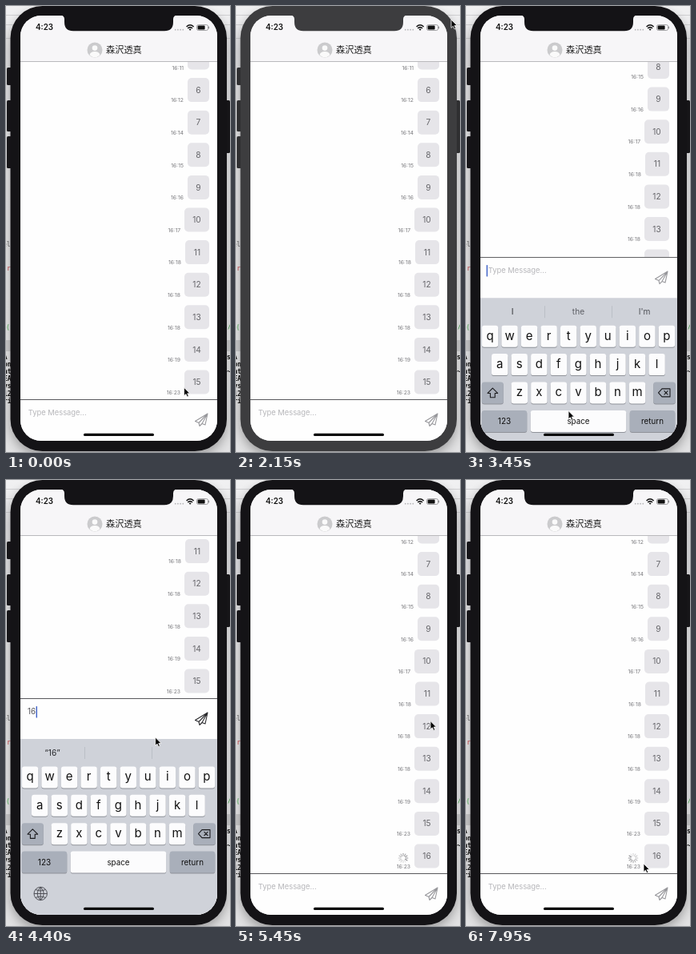
An HTML page for the animation above (8 s loop, 280 by 558 pixels).

```html
<!DOCTYPE html>
<html lang="ja">
<head>
<meta charset="utf-8">
<title>Chat</title>
<style>
html, body { margin: 0; width: 100%; height: 100%; overflow: hidden; background: #dcdcde; }
svg { display: block; width: 100vw; height: 100vh; }
text { font-family: Inter, "Noto Sans CJK JP", "Noto Sans CJK", sans-serif; }
.code text { font-family: "DejaVu Sans Mono", monospace; }
</style>
</head>
<body>
<svg id="stage" viewBox="0 0 280 558">
  <defs>
    <clipPath id="screenClip"><rect x="18" y="12" width="246" height="532" rx="26"/></clipPath>
    <filter id="blur" x="-20%" y="-20%" width="140%" height="140%"><feGaussianBlur stdDeviation="7"/></filter>
    <linearGradient id="desk" x2="0" y2="1">
      <stop offset="0" stop-color="#f1f1f2"/><stop offset=".1" stop-color="#e6e6e8"/>
      <stop offset=".74" stop-color="#ededee"/><stop offset="1" stop-color="#e2e2e3"/>
    </linearGradient>
  </defs>
  <rect width="280" height="558" fill="url(#desk)"/>
  <path d="M0 11.5H280M0 23.5H280M0 40.5H280" stroke="#cfcfd1"/>
  <rect y="418" width="280" height="14" fill="#d0d0d1"/>
  <rect x="5" y="6" width="271" height="557" rx="42" opacity=".32" filter="url(#blur)"/>
  <g id="code" class="code"></g>
  <g id="buttons">
    <rect x="1" y="77" width="7" height="22" rx="1.5"/>
    <rect x="1" y="118" width="7" height="39" rx="1.5"/>
    <rect x="1" y="163" width="7" height="40" rx="1.5"/>
    <rect x="273" y="118" width="7" height="66" rx="1.5"/>
  </g>
  <rect id="bezel" x="5.5" y="0" width="270.5" height="557" rx="40"/>
  <g clip-path="url(#screenClip)">
    <rect x="18" y="12" width="246" height="532" fill="#fefefe"/>
    <g id="list"></g>
    <g id="input">
      <rect x="18" width="246" height="320" fill="#fefefe"/>
      <path d="M18 .5H264" stroke="#58585c"/>
      <path id="send" d="M8-7.5L-7.5 2L-3 4L-2 8L1 5L5 6.5ZM8-7.5L-3 4M8-7.5L1 5" transform="translate(244 25.5)" fill="none" stroke-width="1.1" stroke-linejoin="round"/>
      <rect id="caret" y="10" width="1.4" height="14.5" rx=".5" fill="#3f62c8"/>
    </g>
    <g id="keys"><rect x="18" y="31" width="246" height="240" fill="#cfd2d9"/></g>
    <rect x="18" y="12" width="246" height="57" fill="#f7f6f8"/>
    <path d="M18 69.5H264" stroke="#b9b9bc"/>
    <circle cx="111" cy="55" r="9.5" fill="#cbcbcd"/>
    <circle cx="111" cy="52.6" r="3.3" fill="#fafafa"/>
    <path d="M104.6 61.5Q105 57 111 57T117.4 61.5Q111 67 104.6 61.5" fill="#fafafa"/>
    <g id="head"></g>
    <g fill="#b5b5b8">
      <circle cx="211.7" cy="29.7" r=".9"/><circle cx="214.9" cy="29.7" r=".9"/>
      <circle cx="218.1" cy="29.7" r=".9"/><circle cx="221.3" cy="29.7" r=".9"/>
    </g>
    <g fill="none" stroke="#111" stroke-width="1.5">
      <path d="M225.6 26Q230 21.6 234.6 26M227.2 28Q230 25.2 233 28"/>
      <path d="M230.1 30.8L228.6 29.2Q230.1 28 231.6 29.2Z" fill="#111" stroke="none"/>
      <rect x="238.5" y="23.5" width="14" height="7" rx="2" stroke="#8d8d90" stroke-width=".8"/>
    </g>
    <rect x="239.6" y="24.6" width="9" height="4.8" rx="1" fill="#111"/>
    <path d="M253.6 25.6V28.4" stroke="#8d8d90"/>
    <rect x="97" y="534.8" width="88" height="3.2" rx="1.6" fill="#080808"/>
  </g>
  <path id="notch" d="M68 11Q73 12 73 16.5V20Q73 31.3 84 31.3H198Q209 31.3 209 20V16.5Q209 12 214 11Z"/>
  <path id="mouse" d="M0 0V10.4L2.4 8.2L4 11.8L5.8 11L4.2 7.5H7.4Z" fill="#050505" stroke="#fff" stroke-width=".8" stroke-linejoin="round"/>
</svg>
<script>
const LOOP = 8000;
const $ = id => document.getElementById(id);

function add(parent, tag, attrs, str) {
  const el = document.createElementNS('http://www.w3.org/2000/svg', tag);
  for (const k in attrs) el.setAttribute(k, attrs[k]);
  if (str !== undefined) el.textContent = str;
  return parent.appendChild(el);
}
const label = (parent, x, y, size, fill, str, more) =>
  add(parent, 'text', { x, y, 'font-size': size, fill, ...more }, str);
const mid = { 'text-anchor': 'middle' };
const end = { 'text-anchor': 'end' };
const move = (el, x, y) => el.setAttribute('transform', `translate(${x} ${y})`);
const show = (el, on) => el.setAttribute('visibility', on ? 'visible' : 'hidden');

// header
label($('head'), 37, 30.3, 9.8, '#111', '4:23', { 'font-weight': 600 });
label($('head'), 125, 59.2, 11.2, '#222', '森沢透真');

// window behind the phone
label($('code'), -4, 301, 8, '#555', 'el');
label($('code'), 1, 331, 8, '#b5383c', 'r');
label($('code'), 0, 405, 8, '#3d9a45', '(');
label($('code'), 277, 404, 8, '#3d9a45', '/');
['λ', 'on', 'at', 'EA', 'ys', '12', 'ri'].forEach((s, i) =>
  label($('code'), -3, 442 + i * 9.1, 8, '#111', s, { 'font-weight': 700 }));
label($('code'), 276, 442, 8, '#111', 's', { 'font-weight': 700 });
label($('code'), 276, 460, 8, '#111', '~', { 'font-weight': 700 });

// messages 5..16
const minutes = [11, 12, 14, 15, 16, 17, 18, 18, 18, 19, 23, 23];
let last;
minutes.forEach((m, i) => {
  const n = i + 5, y = 470.5 + (n - 15) * 40.6;
  const w = n < 10 ? 27 : n === 11 ? 30 : 31;
  last = add($('list'), 'g', {});
  add(last, 'rect', { x: 254 - w, y: y - 15, width: w, height: 30, rx: 5, fill: '#e6e5e9' });
  label(last, 254 - w / 2, y + 3.6, 10.2, '#66666a', n, mid);
  label(last, 249 - w, y + 15.3, 6.8, '#77777b', '16:' + m, end);
});

const ticks = [];
for (let i = 0; i < 12; i++)
  ticks.push(add(last, 'path', {
    d: 'M0-3V-5.8', stroke: '#77777b', 'stroke-width': 1.1, 'stroke-linecap': 'round',
    transform: `translate(209 513.6) rotate(${i * 30})`
  }));

// input
const hint = label($('input'), 27.7, 19.6, 9.4, '#b6b6ba', 'Type Message...');
const typed = label($('input'), 27, 19.6, 9.8, '#55555a', '');

// keyboard
const keys = $('keys');
const bar = add(keys, 'g', {});
add(bar, 'rect', { x: 18, width: 246, height: 34, fill: '#cfd2d9' });
add(bar, 'path', { d: 'M98.5 10V25M182.5 10V25', stroke: '#bbbfc6' });
const words = ['I', 'the', "I'm"].map((s, i) =>
  label(bar, [58, 140.5, 223][i], 21, 10.2, ['#2b2c30', '#5d5f65', '#4c4e54'][i], s, mid));

function key(x, y, w, fill, str, size) {
  add(keys, 'rect', { x: x - w / 2, y: y - 12.6, width: w, height: 27, rx: 3.2, fill: '#8f9299' });
  add(keys, 'rect', { x: x - w / 2, y: y - 13.6, width: w, height: 27, rx: 3.2, fill });
  if (str) label(keys, x, y + size * .35 - (size > 12 ? 1 : 0), size, '#111', str, mid);
}
[['qwertyuiop', 30], ['asdfghjkl', 42.2], ['zxcvbnm', 66.8]].forEach(([row, x], r) =>
  [...row].forEach((c, i) => key(x + i * 24.55, 48 + r * 35.4, 20.4, '#fcfcfd', c, 15)));
const gray = '#a9afba';
key(33.3, 118.8, 27, gray);
key(248, 118.8, 27.5, gray);
key(48, 154.2, 56.5, gray, '123', 10);
key(140.5, 154.2, 119.5, '#fcfcfd', 'space', 9.8);
key(233, 154.2, 56.5, gray, 'return', 9.8);
const line = { fill: 'none', stroke: '#1b1b1e', 'stroke-width': 1.1, 'stroke-linejoin': 'round' };
add(keys, 'path', { d: 'M33.3 112.8L27 119.2H30.4V124.4H36.2V119.2H39.6Z', ...line });
add(keys, 'path', { d: 'M240.5 118.6L245 113.6H255V123.6H245ZM247.6 116.2L252.4 121M252.4 116.2L247.6 121', ...line });
add(keys, 'path', {
  d: 'M35 193.5a8.2 8.2 0 1 0 16.4 0a8.2 8.2 0 1 0-16.4 0H51.4M43.2 185.3V201.7M43.2 185.3Q35 193.5 43.2 201.7Q51.4 193.5 43.2 185.3M37 188.6Q43.2 191.6 49.4 188.6M37 198.4Q43.2 195.4 49.4 198.4',
  ...line, 'stroke-width': .9, stroke: '#44464c'
});

// pointer: time, x, y
const path = [
  [0, 222.5, 477.5], [150, 226, 450], [500, 250, 190], [850, 265, 2], [1000, 264, 0], [1040, 264, -16],
  [1380, 272, -16], [1500, 270, 2], [1800, 266, 9], [2150, 269, 17], [2200, 269, 17],
  [2450, 174, 316], [2550, 174, 316], [2650, 143, 531], [2750, 143, 531], [3100, 128, 506.5],
  [3500, 128, 506.5], [4150, 181, 345], [4400, 186.5, 322], [4900, 243, 301], [5850, 243, 302],
  [6150, 236, 360], [6650, 222, 480], [8000, 222, 480]
];
const clamp = v => Math.max(0, Math.min(1, v));
const slide = (t, start) => 1 - Math.pow(1 - clamp((t - start) / 400), 3.53);

function pointer(t) {
  const i = path.findIndex(p => p[0] > t);
  const [t0, x0, y0] = path[i - 1], [t1, x1, y1] = path[i];
  const p = (t - t0) / (t1 - t0);
  return [x0 + (x1 - x0) * p, y0 + (y1 - y0) * p];
}

function draw(t) {
  const shade = t >= 1200 && t < 2200 ? '#3d3d3f' : t >= 1150 && t < 1200 ? '#29292b' : '#141316';
  const idle = t >= 1200 && t < 2200;
  for (const id of ['bezel', 'notch']) $(id).setAttribute('fill', shade);
  $('buttons').setAttribute('fill', idle ? '#2f2f31' : '#161518');

  move($('input'), 0, 492 - 219 * (slide(t, 3300) - slide(t, 5040)));
  move(keys, 0, 544 - 220 * (slide(t, 3300) - slide(t, 5063)));
  move($('list'), 0, 178.4 * slide(t, 5052) - 219 * slide(t, 3379));
  show(keys, t > 3300 && t < 5463);
  show(bar, t > 3300 && t < 5040);

  const str = t < 3950 || t >= 5040 ? '' : t < 4200 ? '1' : '16';
  typed.textContent = str;
  show(hint, !str);
  show($('caret'), t >= 3300 && t < 5040);
  $('caret').setAttribute('x', 25.6 + [0, 6.5, 12][str.length]);
  $('send').setAttribute('stroke', str ? '#2b2b2e' : '#98989c');
  words[0].textContent = str ? `“${str}”` : 'I';
  show(words[1], !str && t > 3300 && t < 5040);
  show(words[2], !str && t > 3300 && t < 5040);

  show(last, t >= 5050);
  last.setAttribute('opacity', clamp((t - 5050) / 250));
  const step = Math.floor(t * 12 / 1000);
  ticks.forEach((el, i) => el.setAttribute('opacity', .2 + .65 * ((i - step + 1200) % 12) / 11));

  move($('mouse'), ...pointer(t));
}

const begin = performance.now();
function frame() {
  draw((performance.now() - begin) % LOOP);
  requestAnimationFrame(frame);
}
draw(0);
requestAnimationFrame(frame);
</script>
</body>
</html>
```
